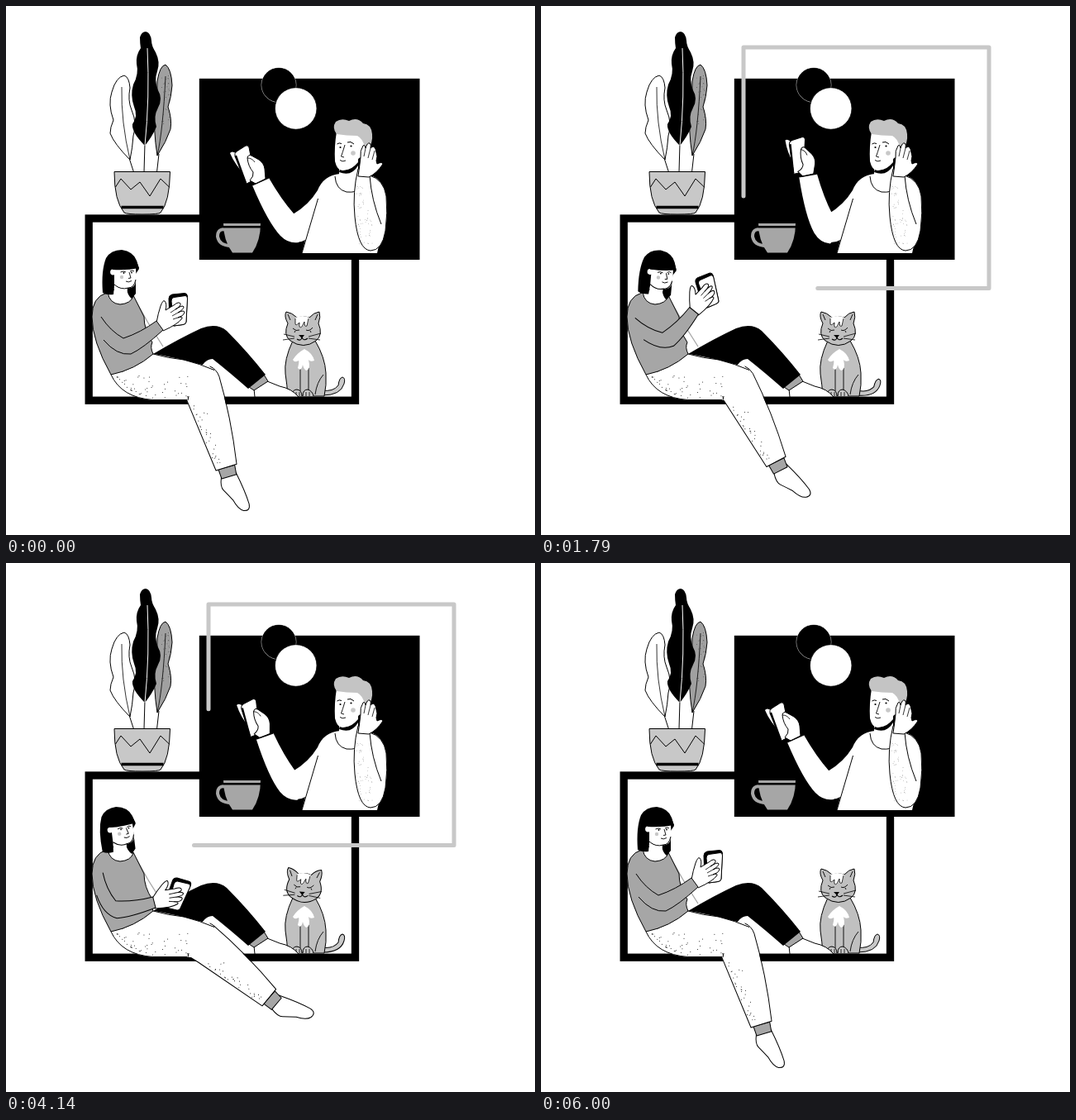
Write an HTML page with a canvas that moves like this. It is 640x640 px and loops after 6070 ms.

```html
<!DOCTYPE html>
<html lang="en">
<head>
<meta charset="utf-8">
<title>Evening call</title>
<style>
html, body { margin: 0; width: 100%; height: 100%; overflow: hidden; background: #fff; }
canvas { display: block; width: 640px; height: 640px; }
</style>
</head>
<body>
<canvas id="stage"></canvas>
<script>
const canvas = document.getElementById('stage');
const ctx = canvas.getContext('2d');
const ratio = window.devicePixelRatio || 1;
canvas.width = canvas.height = 640 * ratio;

const LOOP = 6070, END = 6000;
const BLACK = '#000', WHITE = '#fff', MID = '#a6a6a6', LIGHT = '#c8c8c8', FUR = '#c0c0c0';

const clamp = v => Math.max(0, Math.min(1, v));
const smooth = u => u * u * (3 - 2 * u);
const cubic = u => u < 0.5 ? 4 * u ** 3 : 1 - 4 * (1 - u) ** 3;

// Eased value along [time, value] keys
function track(t, keys) {
  for (let i = 1; i < keys.length; i++) {
    const [t0, a] = keys[i - 1], [t1, b] = keys[i];
    if (t <= t1) return a + (b - a) * smooth((t - t0) / (t1 - t0));
  }
  return keys[keys.length - 1][1];
}

function shape(d, fill, stroke = BLACK, width = 1) {
  const p = new Path2D(d);
  if (fill) { ctx.fillStyle = fill; ctx.fill(p); }
  if (stroke) { ctx.strokeStyle = stroke; ctx.lineWidth = width; ctx.stroke(p); }
}
const fill = (d, color) => shape(d, color, null);
const line = (d, width = 1, color = BLACK) => shape(d, null, color, width);

function disc(x, y, r, color, stroke = null, width = 1) {
  ctx.beginPath();
  ctx.arc(x, y, r, 0, Math.PI * 2);
  ctx.fillStyle = color;
  ctx.fill();
  if (stroke) { ctx.strokeStyle = stroke; ctx.lineWidth = width; ctx.stroke(); }
}

function turned(x, y, degrees, draw) {
  ctx.save();
  ctx.translate(x, y);
  ctx.rotate(degrees * Math.PI / 180);
  ctx.translate(-x, -y);
  draw();
  ctx.restore();
}

// Seeded speckles; place(u, v) gives a point
function speckle(count, seed, place, size = 0.5) {
  let s = seed;
  const rnd = () => (s = (s * 16807) % 2147483647) / 2147483647;
  for (let i = 0; i < count; i++) {
    const [x, y] = place(rnd(), rnd());
    disc(x, y, size, BLACK);
  }
}

function plant() {
  fill('M150 184 L155 201 H184 L185 178 L168 166Z', WHITE);
  line('M149 184 L154.500 201 M168 166 L167 201 M185 179 L182.500 201');
  shape('M150 186 Q131 167 126 154 Q126 147 130 138 Q123 119 128 104 Q133 86 143 84 Q149 86 150 99 Q147 114 152 126 Q159 142 154 157 Q153 172 150 186Z', WHITE);
  line('M140 98 Q139 140 150 186', 0.8);
  shape('M183 181 Q178 150 180 120 Q183 108 183 91 Q186 72 193 71 Q200 76 201 96 Q200 110 196 122 Q201 137 199 149 Q194 164 183 181Z', '#a0a0a0');
  line('M193 85 Q190 150 183 181', 0.8);
  speckle(30, 19, (u, v) => [199 - 9 * u * u - Math.abs(v - 0.55) * 5, 84 + v * 62], 0.35);
  fill('M168 169 Q152 153 153 143 Q160 133 155 122 Q150 108 154 95 Q161 82 158 70 Q157 59 163 51 Q162 45 162 38 Q164 31 169 31 Q175 32 176 42 Q176 48 181 56 Q187 68 183 79 Q179 90 184 102 Q190 112 184 123 Q178 134 182 146 Q177 158 168 169Z', BLACK);
  line('M171 51 Q174 110 168 169', 1, WHITE);
  shape('M131 200.500 H198.500 Q198 237 187 250 Q185 252 165 252 Q146 252 143 250 Q131 236 131 200.500Z', LIGHT);
  line('M132.500 219 L139 209 L151 222 L162 213 L174 230 L187 209 L197.500 219');
  line('M139.500 243.500 H190.500', 3.6);
}

function room() {
  ctx.lineJoin = 'miter';
  ctx.strokeStyle = BLACK;
  ctx.lineWidth = 9.3;
  ctx.strokeRect(100.2, 257, 322.3, 220.2);
  ctx.lineJoin = 'round';
  ctx.fillStyle = BLACK;
  ctx.fillRect(233.800, 87.800, 266.700, 219.200);
  disc(330, 95.500, 21, BLACK, WHITE, 0.6);
  disc(330, 95.500, 20.600, BLACK);
  disc(350.700, 124, 25.300, WHITE, BLACK, 0.8);
}

function cup() {
  line('M267 271 Q256 268 256 279 Q258 290 272 290', 4, MID);
  fill('M263 263 H308 Q308 284 298 298.500 H274 Q263 284 263 263Z', MID);
  line('M263 267.300 H308', 2.400);
}

function manForearm() {
  fill('M298 217 Q317 262 332 278 Q342 288 354 286 L364 268 L348 251 Q333 234 318 208Z', WHITE);
  fill('M271 178 Q273 175 278 178 L288 203 Q277 192 271 178Z', WHITE);
  shape('M277 182 Q276 178 279 176 L290 169 Q293 168 294 171 L301 207 Q300 211 291 215Z', WHITE);
  line('M278 181 L290 214', 2.200);
  shape('M302 215 L295 211 Q300 206 299 201 Q293 194 292 184 Q293 179 297 181 L306 186 Q312 190 313 197 L314 209Z', WHITE);
  line('M292 184 Q298 184 301 189', 0.8);
  line('M298 217 L318 208', 1.200);
}

function man(swing) {
  fill('M404 203 Q384 205 377 223 Q366 241 347 252 L346 285 Q356 287 362 283 L358 299 H449 L461 245 Q459 208 440 205 L425 203Z', WHITE);
  turned(346, 270, swing, manForearm);
  line('M377.500 233 L358 299');
  fill('M403 190 V212 Q414 220 426 212 V185Z', WHITE);
  line('M398 206 Q399 222 412 225 Q424 226 430 221');
  fill('M404 197 Q415 202 426 189 L426 193 Q418 207 403 201Z', BLACK);
  fill('M400 152 Q397 170 398 188 Q401 200 408 199 Q420 197 427 184 Q438 182 440 170 L438 156Z', WHITE);
  fill('M400 155 Q394 147 399 140 Q406 135 415 139 Q425 134 432 142 Q442 143 443 155 Q444 165 438 174 L434 170 Q431 160 425 157 Q412 157 400 155Z', '#c4c4c4');
  disc(420, 178, 2.800, LIGHT);
  line('M400.500 167 Q403 165 406 166.500 M413 165 Q417 163 421 167');
  disc(404.500, 171, 1.100, BLACK);
  disc(417.500, 169.500, 1.100, BLACK);
  line('M410 168 Q407 178 405.500 182 L409 183 M404 186.500 Q407 189 411 187', 0.9);

  shape('M426 197 Q419 225 422 255 Q426 295 441 296 Q455 296 459 272 Q462 250 460 230 Q457 210 440 205 L439 198Z', WHITE);
  line('M440 205 Q442 235 454 264');
  speckle(60, 77, (u, v) => [424 + 3 * v + u * (7 + 15 * v), 218 + v * 70], 0.28);
  shape('M426 206 Q428 192 429 183 Q428 175 432 169 Q434 167 435 172 Q437 165 440 166 Q442 167 441 172 Q445 168 447 173 L449 182 Q447 188 449 191 Q455 188 456 191 Q449 202 439 207Z', WHITE);
  line('M435 172 L433 182 M441 172 L438 184 M446 175 L443 186', 0.8);
}

function catHead() {
  shape('M341 384 Q336 375 339 370 Q346 371 352 377 Q360 374 367 377 Q372 371 379 370 Q381 376 378 384 Q384 398 375 405 Q360 416 344 405 Q335 398 341 384Z', FUR);
  line('M341 373 L344 380 M377 373 L374 380', 0.9);
  fill('M350 377 Q359 373 367 377 L364 387 Q362 389 361 383 Q358 392 355 388 L355 383 Q350 389 350 384Z', WHITE);
  line('M350 378 V384 Q350 388 355 383 Q354 391 358 388 L361 382 Q361 389 364 387 L366 378', 0.8);
  line('M347 390 Q351 394 355 392 M363 392 Q367 394 371 389 M350 393 L349 395 M368 393 L369 395', 0.9);
  fill('M354 398 H361 L358 402Z', BLACK);
  line('M358 401 Q357 406 352 403 M358 401 Q360 406 365 402', 1.100);
  line('M349 400 L336 397 M349 402 L335 404 M366 400 L381 396 M366 402 L380 404', 0.8);
}

function cat(tilt, wag) {
  turned(383, 468, wag, () => {
    shape('M382 465 Q396 467 402 459 Q403 450 407 449 Q411 450 409 457 Q405 471 383 471Z', LIGHT);
  });
  shape('M347 405 Q336 428 338 445 Q340 458 341 472 H385 Q388 459 387 444 Q386 425 374 405Z', FUR);
  line('M356 438 V466 M366 438 V466 M384 446 Q376 455 374 470', 0.9);
  fill('M361 415 Q371 420 373 429 Q368 431 366 428 Q369 440 363 441 Q360 439 359 434 Q357 443 353 438 Q355 430 354 429 Q349 432 347 428 Q352 420 361 415Z', WHITE);
  turned(360, 408, tilt, catHead);
  shape('M346 472 Q346 464 352 464 Q358 465 358 472 M359 472 Q359 464 365 464 Q371 466 372 472', LIGHT);
  line('M351 467 V472 M355 467 V472 M363 467 V472 M367 467 V472', 0.8);
}

function farLeg() {
  shape('M300 463 L301 473 H354 Q346 463 331 460 L316 454Z', WHITE);
  shape('M294 461 L312 446 L317 454 L300 465Z', MID);
  fill('M178 421 Q210 402 236 390 Q255 383 267 393 Q292 418 314 446 L293 463 Q269 442 250 427 Q243 427 238 434 L205 430Z', BLACK);
}

function shin(flex) {
  turned(0, 113, -flex, () => {
    shape('M-8.500 117 Q-13 128 -10 133 Q-6 140 -2 147.500 Q1 160 7 163 Q15 166 15.500 157 Q15 141 10 116Z', WHITE);
  });
  shape('M-9.400 107 H11 L10 118.500 L-8.500 119Z', MID);
  fill('M-27 0 L-24.500 15 L-12.600 107.500 L13.600 106.500 Q20 55 21 -1.500Z', WHITE);
  line('M-27 0 L-24.500 15 L-12.600 107.500 L13.600 106.500 Q22 50 21 -1.500');
  speckle(30, 411, (u, v) => {
    const y = 24 + v * 76;
    return [-22 + y * 0.1 + u * u * (16 - 9 * v), y];
  });
}

function nearLeg(angle, flex) {
  const px = 238, py = 455, a = -angle * Math.PI / 180;
  ctx.save();
  ctx.translate(px, py);
  ctx.rotate(a);
  shin(flex);
  ctx.restore();
  fill('M127 446 Q156 440 179 421 Q220 428 245 437 L250 443 L246 460 L226 477 H178 Q140 474 127 446Z', WHITE);
  line('M127 446 Q140 474 178 476.500 L219 476.500 M221 472 L220 477');
  line('M178 421 Q196 426 215 428 Q235 433 252 440.500');
  const from = -1.15, to = a - 0.07;
  if (to > from) {
    ctx.beginPath();
    ctx.arc(px, py, 21, from, to);
    ctx.lineWidth = 1;
    ctx.stroke();
  }
  speckle(52, 2024, (u, v) => {
    const x = 133 + u * 88;
    const low = 474 - 26 * (Math.max(0, 178 - x) / 45) ** 2;
    return [x, low - v * v * 26];
  });
}

function girlArm() {
  shape('M197 354 Q197 350 201 349 L216 347.500 Q219 347.500 219.500 351 L218 382 Q218 385 214 385.500 L203 387 Q199 387 198 383Z', BLACK);
  shape('M200 357 Q200 353 203 352.500 L217 350.500 Q219.500 350.500 219.500 354 L218 382 Q218 385 214 385.500 L203 387Z', WHITE);
  shape('M182 383 Q184 372 187 363 Q190 355 192 357 Q195 360 193 368 L203 362 Q209 357 211 360 Q212 363 205 367 Q214 361 215 364 Q215 367 208 371 Q216 367 216 371 Q215 375 208 377 Q214 375 213 378 Q208 385 190 393Z', WHITE);
  line('M205 367 L199 371 M208 371 L201 375 M208 377 L202 379', 0.8);
  fill('M115 376 Q126 393 142 402 Q163 395 182 381 L190 392 Q166 414 151 421 Q135 424 118 404Z', MID);
  line('M115 376 Q126 393 142 402 Q163 395 182 381 L190 392 Q166 414 151 421 Q134 423 118 404');
}

function girlHead() {
  fill('M117 347 Q115 320 121 305 Q127 295 140 295 Q154 297 158 308 L161 318 L157 324 V348 L152 354 Q147 350 146 342 L131 339 L130 349 Q122 350 117 347Z', BLACK);
  fill('M131 319 L157 317 Q158 330 156 337 Q153 342 147 341 L146 352 Q138 356 131 351Z', WHITE);
  line('M131 337 Q139 344 148 341 Q155 341 157 331');
  disc(129.500, 322, 3.400, WHITE);
  fill('M129 319 Q147 320 161 317 L158 309 H129Z', BLACK);
  disc(140, 328, 2.200, LIGHT);
  line('M138.500 322 Q142 320 145 322 M150 321 Q153 319 155 321', 0.9);
  disc(142.500, 323, 0.9, BLACK);
  disc(152, 322.500, 0.9, BLACK);
  line('M149 322 L151 329 L148 329.500 M145 333 Q148 335 152 332.500', 0.9);
}

function girl(arm, leg, flex) {
  farLeg();
  nearLeg(leg, flex);
  line('M157 357 Q172 385 190 412', 1.300, MID);
  shape('M122 347 Q104 352 104 376 Q104 405 127 446 Q156 440 178 421 Q174 413 177 407 Q167 392 167 376 L154 350Z', MID);
  shape('M123 346 Q125 360 138 361 Q151 360 154 351 L149 343 H131Z', WHITE);
  turned(136, 350, -arm / 3, girlHead);
  turned(119.5, 381, arm, girlArm);
}

function wire(from, to) {
  if (to - from < 1) return;
  ctx.save();
  ctx.lineCap = 'round';
  ctx.setLineDash([to - from, 5000]);
  ctx.lineDashOffset = -from;
  line('M245 230 V50 H542 V341.500 H227', 5, LIGHT);
  ctx.restore();
}

const WIRE = 1083;
const wireHead = t => WIRE * cubic(clamp((t + 64) / 2618)) * clamp(t / 70);

function wireTail(t) {
  if (t < 5210) return WIRE * cubic(clamp((t - 3373) / 3330));
  return WIRE * (1 - 0.36 * clamp((END - t) / 790) ** 1.587);
}

function legAngle(t) {
  if (t > 5400) return -7 + 22.2 * ((t - 5400) / 600) ** 2;
  return track(t, [[0, 15.2], [1400, 39.5], [2500, -9], [2670, -9], [3670, 50], [4000, 50], [5400, -7]]);
}

function manSwing(t) {
  if (t < 3000) return 14 * smooth(clamp(t / 1800));
  return 14 * (1 - smooth(clamp((t - 3000) / 2250) ** 0.75));
}

const footFlex = t => track(t, [[0, 0], [1100, 13], [1400, 13], [2430, 1], [3140, 10], [4140, 11], [5210, 1], [END, 0]]);
const armAngle = t => track(t, [[0, 0], [1250, -15.3], [2430, -15.3], [3530, 21.5], [4200, 21.5], [5790, 0], [END, 0]]);
const catTilt = t => track(t, [[0, 0], [1900, 0], [3140, 8], [3400, 8], [4900, 0], [END, 0]]);
const tailWag = t => track(t, [[0, 0], [600, 5], [2500, 5], [3200, 0], [4100, 0], [5000, 4], [END, 0]]);

function render(t) {
  ctx.setTransform(ratio, 0, 0, ratio, 0, 0);
  ctx.lineJoin = 'round';
  ctx.fillStyle = WHITE;
  ctx.fillRect(0, 0, 640, 640);
  room();
  plant();
  man(manSwing(t));
  cup();
  cat(catTilt(t), tailWag(t));
  girl(armAngle(t), legAngle(t), footFlex(t));
  wire(wireTail(t), wireHead(t));
}

const start = performance.now();
function tick() {
  render(Math.min((performance.now() - start) % LOOP, END));
  requestAnimationFrame(tick);
}
tick();
</script>
</body>
</html>
```
